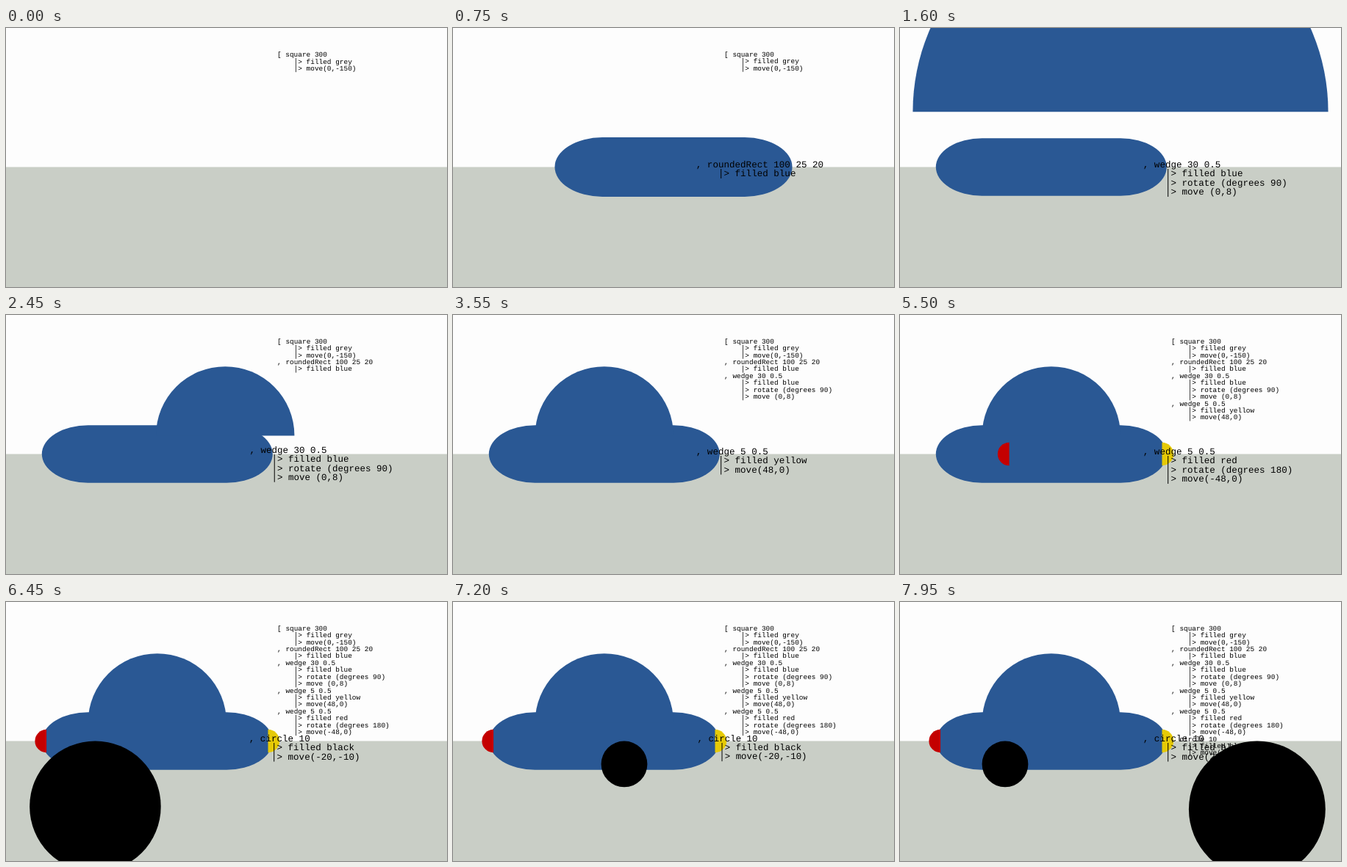
Write an HTML page that moves like this. It is 600 px wide and 353 px high and loops after 8 s.

```html
<!DOCTYPE html>
<html lang="en">
<head>
<meta charset="utf-8">
<title>Building a car from shapes</title>
<style>
  html, body { margin: 0; width: 100%; height: 100%; overflow: hidden; background: #fdfdfd; }
  svg { display: block; width: 100vw; height: 100vh; }
  text { font: 4px "Liberation Mono", "DejaVu Sans Mono", monospace; text-rendering: geometricPrecision; }
  .bar { stroke: #000; stroke-width: .32; }
</style>
</head>
<body>
<svg viewBox="0 0 600 353"><g id="stage" transform="translate(300 189.5) scale(3.14)"></g></svg>
<script>
const LOOP = 8000, STEP = 50;
const TURN = Math.PI / 2;   // seconds each shape takes to arrive
const START = 0.025;        // arrival of the first shape after the ground
const CHAR = 2.4, LINE = 4; // text cell at full size
const BLUE = '#2a5894', YELLOW = '#e6ca06', RED = '#c40000';

const wedge = (r, fill, turn, x, y) => ['path', {
  d: `M0 ${-r}A${r} ${r} 0 0 1 0 ${r}Z`, fill,
  transform: `translate(${x} ${y}) rotate(${turn})`
}];
const wheel = x => ['circle', { cx: x, cy: 10, r: 10, fill: '#000' }];

const items = [
  { shape: ['rect', { x: -150, y: 0, width: 300, height: 300, fill: '#c9cec6' }],
    code: ['[ square 300', 'filled grey', 'move(0,-150)'] },
  { shape: ['rect', { x: -50, y: -12.5, width: 100, height: 25, rx: 20, ry: 12.5, fill: BLUE }],
    code: [', roundedRect 100 25 20', 'filled blue'] },
  { shape: wedge(30, BLUE, -90, 0, -8),
    code: [', wedge 30 0.5', 'filled blue', 'rotate (degrees 90)', 'move (0,8)'] },
  { shape: wedge(5, YELLOW, 0, 48, 0),
    code: [', wedge 5 0.5', 'filled yellow', 'move(48,0)'] },
  { shape: wedge(5, RED, 180, -48, 0),
    code: [', wedge 5 0.5', 'filled red', 'rotate (degrees 180)', 'move(-48,0)'] },
  { shape: wheel(-20),
    code: [', circle 10', 'filled black', 'move(-20,-10)'] },
  { shape: wheel(20),
    code: [', circle 10', 'filled black', 'move(20,-10)'] }
];

function add(parent, tag, attrs = {}, content = '') {
  const el = document.createElementNS('http://www.w3.org/2000/svg', tag);
  for (const name in attrs) el.setAttribute(name, attrs[name]);
  el.textContent = content;
  return parent.appendChild(el);
}

const stage = document.getElementById('stage');
let lineCount = 0;
for (const item of items) {
  item.group = add(stage, 'g');
  item.figure = add(item.group, 'g');
  add(item.figure, ...item.shape);
  item.label = add(item.group, 'g');
  item.code.forEach((line, i) => {
    if (i) add(item.label, 'text', { x: CHAR * 5, y: LINE * i }, '> ' + line);
    else add(item.label, 'text', {}, line);
  });
  const x = CHAR * 4.5;
  add(item.label, 'line', { class: 'bar', x1: x, x2: x, y1: .8, y2: LINE * (item.code.length - 1) + .9 });
  item.listY = -48 + 3 * lineCount;
  lineCount += item.code.length;
}

const mix = (a, b, k) => a + (b - a) * k;

function draw(ms) {
  const seconds = ms / 1000 - START;
  items.forEach((item, i) => {
    const phase = Math.min(seconds - (i - 1) * TURN, TURN);
    item.group.setAttribute('display', phase < 0 ? 'none' : 'inline');
    if (phase < 0) return;
    // First half: shrink into size. Second half: slide into place.
    const wave = Math.cos(2 * phase) ** 2;
    const shrinking = phase < TURN / 2;
    const scale = shrinking ? 1 + 2 * wave : 1;
    const slide = shrinking ? 0 : wave;
    item.figure.setAttribute('transform', `translate(${-30 * slide} 0) scale(${scale})`);
    item.label.setAttribute('transform',
      `translate(${mix(9.8, 22, slide)} ${mix(0, item.listY, slide)}) scale(${mix(1, .75, slide)})`);
  });
}

const begin = performance.now();
function tick() {
  const ms = (performance.now() - begin) % LOOP;
  draw(Math.floor(ms / STEP) * STEP);
  requestAnimationFrame(tick);
}
tick();
</script>
</body>
</html>
```
